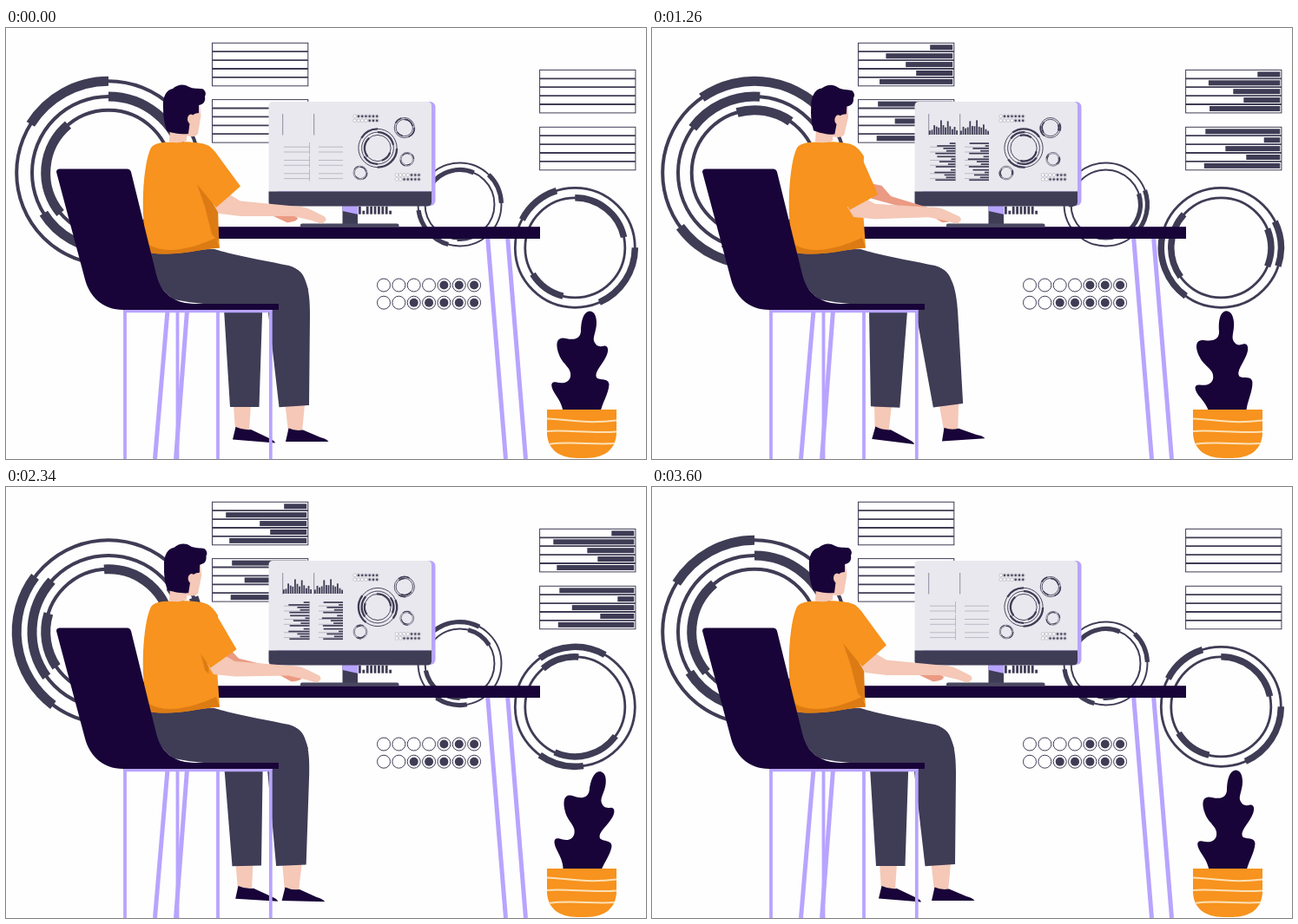
Animation, 737 px wide and 497 px high, one loop 3.63 s. Source, as an HTML page:

```html
<!DOCTYPE html>
<html lang="en">
<head>
<meta charset="utf-8">
<title>Desk dashboard</title>
<style>
html, body { margin: 0; width: 100%; height: 100%; overflow: hidden; background: #fefefe; }
svg { display: block; width: 737px; height: 497px; }
</style>
</head>
<body>
<svg id="stage" viewBox="0 0 737 497"></svg>
<script>
const SLATE = '#3f3c55', INK = '#180438', LILAC = '#b8a4ff', ORANGE = '#f7931e',
  SHADE = '#dc7b14', SKIN = '#f5c8b7', FAR_SKIN = '#eb9a83', RULE = '#9b99aa';
const LOOP = 3630, TURN = 3600, STEP = 30, GROW = 920, REACHED = 950;
const stage = document.getElementById('stage');
const updates = [];

function el(parent, tag, attrs = {}) {
  const node = document.createElementNS('http://www.w3.org/2000/svg', tag);
  for (const key in attrs) node.setAttribute(key, attrs[key]);
  parent.appendChild(node);
  return node;
}
const group = (parent, transform = '') => el(parent, 'g', { transform });
const shape = (parent, d, fill) => el(parent, 'path', { d, fill });
const line = (parent, d, stroke, width) =>
  el(parent, 'path', { d, stroke, fill: 'none', 'stroke-width': width });
const rect = (parent, x, y, width, height, fill, rx = 0) =>
  el(parent, 'rect', { x, y, width, height, fill, rx });

// A group whose transform is computed from the time
function moving(parent, transformAt) {
  const g = group(parent);
  updates.push(t => g.setAttribute('transform', transformAt(t)));
  return g;
}

// Rings: each track is [radius, direction, phase, ...[start, sweep]]
function arc(r, start, sweep) {
  const at = a => `${r * Math.cos(a * Math.PI / 180)},${r * Math.sin(a * Math.PI / 180)}`;
  return `M${at(start)}A${r},${r} 0 0 1 ${at(start + sweep)}`;
}
function ring(x, y, tracks, thin, thick, scale = 1) {
  const root = group(stage, `translate(${x} ${y}) scale(${scale})`);
  for (const [r, dir, phase, ...arcs] of tracks) {
    el(root, 'circle', { r, fill: 'none', stroke: SLATE, 'stroke-width': thin });
    const spin = moving(root, t => `rotate(${phase + dir * t / TURN * 360})`);
    for (const [start, sweep] of arcs) line(spin, arc(r, start, sweep), SLATE, thick);
  }
}
const triple = [
  [105.8, -1, 0, [212, 58], [1, 90]],
  [88, 1, 0, [90, 58], [270, 78]],
  [72.3, -1, 0, [140, 90], [20, 51]]
];
const double = (dir, outer = 0, inner = 0) => [
  [69, dir, outer, [208, 44], [0, 66]],
  [57.5, -dir, inner, [270, 78], [104, 44]]
];

// Bars grow leftwards or upwards after a delay and drop to nothing at the loop's end
const grown = (t, delay) =>
  t >= TURN ? 0 : Math.min(1, Math.max(0, (t - delay) / GROW));

function bar(x, y, width, height, delay, axis) {
  const grow = moving(stage, t => {
    const s = grown(t, delay);
    return `translate(${x} ${y}) scale(${axis == 'x' ? s + ' 1' : '1 ' + s})`;
  });
  rect(grow, -width, -height, width, height, SLATE);
}
const stagger = (first, step, i) => 80 + (first + step * i) % 430;
const widths = [[26, 93, 54, 42, 89], [86, 19, 71.5, 39, 87.5]];

function panel(x, y, set, first, step) {
  const pitch = 9.9, w = 110.3;
  el(stage, 'rect', {
    x, y, width: w, height: pitch * 5, fill: '#fff', stroke: SLATE, 'stroke-width': 1
  });
  widths[set].forEach((full, i) => {
    const top = y + i * pitch;
    if (i) line(stage, `M${x},${top}h${w}`, SLATE, 1.8);
    bar(x + w - 1.6, top + 8, full, 6, stagger(first, step, i), 'x');
  });
}
panel(237.5, 17.3, 0, 170, 250);
panel(237.5, 82.6, 1, 206, 59);
panel(614.6, 48.4, 0, 230, 135);
panel(614.6, 114.3, 1, 190, 90);

ring(118, 167, triple, 4, 11);
ring(655.3, 253.3, double(1), 2.8, 7.5);
ring(522.5, 203.5, double(-1, 106, -54), 2.8, 7.5, .695);

// Two rows of seven dots, the first few left empty
function dots(x, y, scale, ...empties) {
  const root = group(stage, `translate(${x} ${y}) scale(${scale})`);
  empties.forEach((empty, row) => {
    for (let i = 0; i < 7; i++) {
      const cx = i * 17.35, cy = row * 20.2;
      el(root, 'circle', { cx, cy, r: 7.5, fill: '#fff', stroke: SLATE, 'stroke-width': 1 });
      if (i >= empty) el(root, 'circle', { cx, cy, r: 5, fill: SLATE });
    }
  });
}
dots(435, 296.5, 1, 4, 2);

// Desk and monitor
line(stage, 'M554.5,240L575.5,497M577.5,240L598.5,497', LILAC, 5);
rect(stage, 243, 229.2, 372, 13.8, INK);
for (let i = 0; i < 9; i++) {
  const h = i == 1 || i == 8 ? 4 : 9;
  rect(stage, 406 + i * 4.4, 214.7 - h, 2.8, h, SLATE);
}
rect(stage, 387.5, 203, 17.5, 24, SLATE);
shape(stage, 'M387.5,203H405.5V215L387.5,211Z', LILAC);
shape(stage, 'M339,229.5V227Q339,225.5 341,225.5H450Q452.5,225.5 452.5,227.5V229.5Z', '#4a4861');
rect(stage, 312, 85, 182.5, 120, LILAC, 6);
shape(stage, 'M302.5,188.5V90Q302.5,85 307.5,85H485Q490,85 490,90V188.5Z', '#e9e8ee');
shape(stage, 'M302.5,188.5H490V200.5Q490,205.5 485,205.5H307.5Q302.5,205.5 302.5,200.5Z', SLATE);

// Column charts with heights that rise and fall around the middle
line(stage, 'M318.7,99V123.5M354.7,99V123.5', '#77758a', .8);
for (const c of [0, 1])
  for (let i = 0; i < 13; i++) {
    const h = 3 + 14 * Math.sin(Math.PI * (i + 1) / 14) * Math.abs(Math.sin(i * 2.1 + c * 2 + .6));
    bar(320.8 + c * 36 + i * 2.6, 123, 1.8, h, stagger(230 - c * 180, 97, i) * .8, 'y');
  }

// Small row charts
for (const c of [0, 1])
  for (let g = 0; g < 3; g++) {
    const left = 320 + c * 40, right = 349.5 + c * 38.5, top = 132 + g * 15.3;
    widths[(g + c) % 2].forEach((w, i) => {
      const y = top + i * 2.9;
      if (i % 2) line(stage, `M${left},${y + 2.3}H${right}`, RULE, .6);
      bar(right, y + 1.9, w * .26, 1.7, stagger(200 + g * 110, 173, i), 'x');
    });
    if (!c) line(stage, `M${right},${top}v14`, RULE, .6);
  }

ring(428, 138.5, triple, 4.5, 11, .209);
ring(458.8, 115, double(1), 5, 10, .168);
ring(461.8, 151.3, double(-1, 106, -54), 5, 9, .115);
ring(408, 167, double(1), 5, 9, .115);
dots(401.7, 101.8, .245, 1, 4);
dots(450, 169.5, .245, 4, 2);

// Swing out one way in the first half of the turn and the other way in the second
const sway = (t, out, back) =>
  (t < TURN / 2 ? out : back) * Math.sin(2 * Math.PI * t / TURN) ** 2;
// Quick move out, slower return, both eased
const ease = u => (1 - Math.cos(Math.PI * u)) / 2;
const reach = t =>
  ease(t < REACHED ? t / REACHED : Math.max(0, (TURN - t) / (TURN - REACHED)));

// Legs
const backLeg = moving(stage, t => `rotate(${sway(t, 3.9, -1.6)} 271 300)`);
shape(backLeg, 'M262,434H282L280,465H264Z', SKIN);
shape(backLeg, 'M264.5,460L261,474.5L310,478.5Q309,475.5 303,473L282,463Q273,464 264.5,460Z', INK);
shape(backLeg, 'M249.5,300H296L291.5,437H258Z', SLATE);

const frontLeg = moving(stage, t => `rotate(${sway(t, -5.8, 2.1)} 322 296)`);
shape(frontLeg, 'M321.5,434H344L341,466H325Z', SKIN);
shape(frontLeg, 'M325.5,461.5L322,477H371.5Q369,473.5 362,472L342,463.5Q333,465 325.5,461.5Z', INK);
shape(frontLeg, 'M299,302C302,286 312,275 324,275C336,276 342,282 345,292C349,302 350,315 350,330L349,435L314.5,437.2Z', SLATE);
shape(stage, 'M160,256L240,255C262,262 300,268.5 326,274C338,277 344,288 348,302L315,320H215C190,318 176,300 166,275Z', SLATE);

// Arms and shirt
const farArm = moving(stage, t => {
  const s = reach(t);
  return `translate(${11 * s} ${s}) rotate(${6.5 * s} 335 220)`;
});
shape(farArm, 'M240,189L250,190L262,201L320,212Q333,216 336,219Q336,223 324,224.5L308,217L240,206Z', FAR_SKIN);
shape(stage, 'M167,138Q170,133.5 180,132C195,131 215,130.5 224,133C234,134 239,140 244,148L242,195L246,253.5C222,255 195,264 164,259C159,240 157,215 158,190C159,168 162,148 167,138Z', ORANGE);
shape(stage, 'M164.5,250C186,262 215,254 242,242L246,253.5C222,255 195,264 165.5,259Z', SHADE);
const fold = moving(stage, t => `translate(220 180) scale(${1 - reach(t)})`);
shape(fold, 'M0,0L24,22L25,66L17,58L9,26Z', SHADE);
const nearArm = moving(stage, t => {
  const s = reach(t);
  return `translate(${-13 * s} 0) rotate(${-2 * s} 366 222)`;
});
shape(nearArm, 'M238,202L255,190.5L270,199.5L332,205.5Q343,205.5 350,209L367,217.5Q370,222 367,223Q366,226 361,225L352,222L331,217L270,217L245,214Z', SKIN);
const sleeve = moving(stage, t => `rotate(${13 * reach(t)} 222 143)`);
shape(sleeve, 'M210,140L224,133L234,136L241,143L270,182.5L242,207L219,179Z', ORANGE);

// Head
shape(stage, 'M189,116H209L208,130Q198,134 188,131Z', SKIN);
const head = moving(stage, t => `rotate(${3.6 * reach(t)} 200 128)`);
shape(head, 'M204,88H223L224.5,101L221,122Q217,127 207,124Z', SKIN);
shape(head, 'M181,92C180,79 185,71 192,70C197,65 205,64 210,67.5C216,71 222,69 227,70.5C231,74 230,77 229,79C230,84 228,88 222,89L222,98C217,98 213,101 212,106L210,122C202,123 191,121 185.5,119C182,110 181,101 181,92Z', INK);
el(head, 'ellipse', { cx: 213, cy: 105, rx: 4, ry: 5.5, fill: SKIN });

// Chair
line(stage, 'M186,326L171.5,497M208.5,326L195.5,497', LILAC, 5);
line(stage, 'M137,326V497M197.5,326V497M244,326V497M304.8,326V497M135,326.3H306.8', LILAC, 3.8);
shape(stage, 'M190,312Q203,319.5 240,319Q208,317 190,312Z', '#fefefe');
shape(stage, 'M58,166Q58,162.5 62,162.5H139.5Q143,162.5 144,166L173,284C178,305 193,318 217,318H314V325H135C111,325 96,309 91,290Z', INK);

// Plant
const plant = moving(stage, t => `rotate(${sway(t, -8.6, 9.3)} 663 441)`);
shape(plant, 'M672,326.5C665,327 662,338 662,350C661,359 653,360 645,358C634,355 632,364 637,377C641,388 652,392 650,402C648,410 640,410 634,408.5C626,407 627,414 633,423C639,432 641,437 642,445H684C686,433 694,422 694.5,411C694,403 684,407 680,403C677,397 686,389 691,379C695,371 693,366 689,366.5C683,368 680,367 677.5,362C675,357 680,350 680,340C680,331 677,327 672,326.5Z', INK);
shape(stage, 'M623,440H703V466C703,485 690,496 668,496H658C636,496 623,485 623,466Z', ORANGE);
line(stage, 'M623,450.5C645,451 665,457 703,452.5M623,465C645,463 675,468 703,465.5M625,480C650,476 675,481 701,479', '#fde0b4', 2);

function frame(now) {
  const t = Math.floor(now % LOOP / STEP) * STEP;
  for (const update of updates) update(t);
  requestAnimationFrame(frame);
}
frame(0);
</script>
</body>
</html>
```
